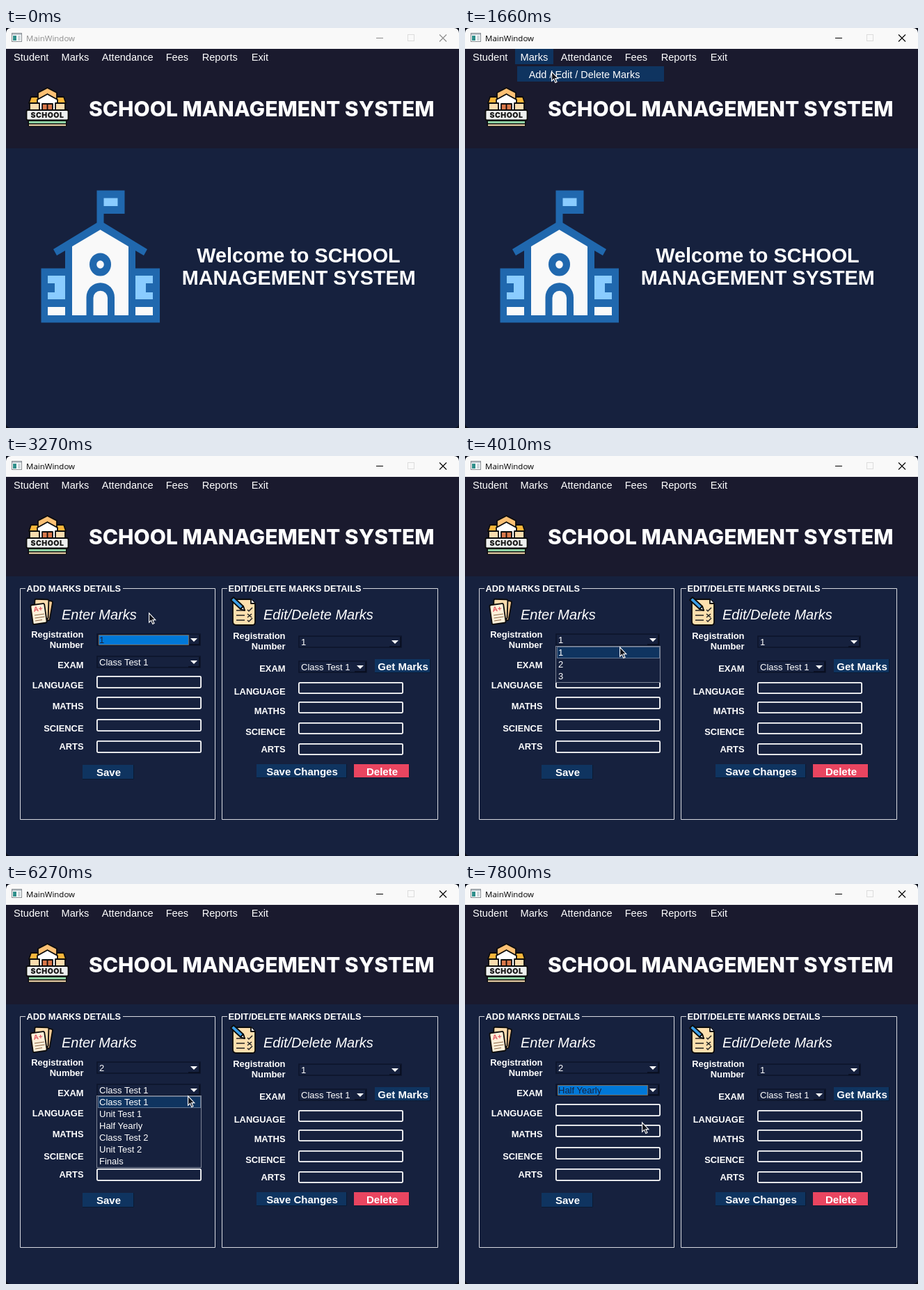
Animation of 651x575 px, one loop 8 s. Source, as an HTML page:

```html
<!DOCTYPE html>
<html lang="en">
<head>
<meta charset="utf-8">
<title>School management</title>
<style>
  html, body { margin: 0; height: 100%; overflow: hidden; background: #0b0f1a; }
  svg { display: block; }
  text { font: 13px "Liberation Sans", Arial, sans-serif; fill: #fff; white-space: pre; }
  .caption { font: 11.5px "Open Sans", sans-serif; fill: var(--ink); }
  .menu { font-size: 14.6px; }
  .item { font-size: 14.45px; }
  .banner { font: 800 30px Inter, sans-serif; }
  .sign { font: 900 10.5px Inter, sans-serif; fill: #161616; text-anchor: middle; letter-spacing: .5px; }
  .welcome { font-size: 28.8px; font-weight: bold; text-anchor: middle; }
  .legend { font-size: 12.8px; font-weight: bold; }
  .heading { font-size: 20px; font-style: italic; }
  .label { font-size: 12.9px; font-weight: bold; text-anchor: end; }
  .button { font-size: 15px; font-weight: bold; text-anchor: middle; }
  .grade { font: bold 10px "Liberation Sans", sans-serif; fill: #e0525e; }
  .outlined { stroke: #0c0c0c; stroke-width: 1.8; stroke-linejoin: round; }
</style>
</head>
<body>
<svg id="stage" width="651" height="575" viewBox="0 0 651 575"></svg>
<script>
const NAVY = '#16213e', BLUE = '#0f3460', RED = '#e94560';
const LOOP = 8000, STEP = 120, ROW = 17;
const exams = ['Class Test 1', 'Unit Test 1', 'Half Yearly', 'Class Test 2', 'Unit Test 2', 'Finals'];

const text = (x, y, s, cls = '', extra = '') => `<text x="${x}" y="${y}" class="${cls}" ${extra}>${s}</text>`;
const rect = (x, y, w, h, fill, extra = '') =>
  `<rect x="${x}" y="${y}" width="${w}" height="${h}" fill="${fill}" ${extra}/>`;
const path = (d, fill, extra = '') => `<path d="${d}" fill="${fill}" ${extra}/>`;
const group = (id, ...parts) => `<g id="${id}">${parts.join('')}</g>`;

function titleBar() {
  return rect(0, 0, 651, 30, '#f9f9f9') +
    rect(8.5, 7.5, 14, 12, '#fff', 'stroke="#8a8f94"') + rect(9, 8, 13, 2, '#b9c3ca') +
    rect(10, 11, 5, 7, '#2f8f8b') + rect(17, 11, 4, 7, '#cfd8dc') +
    text(29, 19, 'MainWindow', 'caption') +
    rect(577.5, 9.5, 9, 9, 'none', 'stroke="#dcdcdc"') +
    path('M532 14.5H542M623 9.5L633 19.5M633 9.5L623 19.5', 'none', 'stroke="var(--ink)" stroke-width="1.1"');
}

function emblem() {
  const shape = (d, fill) => path(d, fill, 'class="outlined"');
  return shape('M34 106H85V120H34Z', '#fbdcae') +
    shape('M36 99H48V108H33ZM71 99H83L86 108H71Z', '#fcb53b') +
    shape('M59.5 86L73 93V106H46V93Z', '#fdc074') +
    shape('M59.5 95L74 103V108H71V119H48V108H45V103Z', '#fff') +
    shape('M52 109H67V119H52Z', '#d9774a') + path('M59.5 109V119', 'none', 'class="outlined"') +
    rect(31.5, 132, 56, 10, '#0c0c0c', 'rx="3"') +
    rect(33, 134, 53, 3, '#8ed2a4') + rect(33, 138.5, 53, 2.2, '#f3d9b0') +
    rect(29.5, 118, 60, 14.5, '#eef0ef', 'rx="2" class="outlined"') +
    text(59.5, 129, 'SCHOOL', 'sign');
}

function schoolHouse() {
  const blue = '#2068ae', sky = '#8accff', white = '#f9f9f9';
  return rect(50.5, 345.5, 170.5, 78, blue) + rect(85, 310, 101, 110, blue) +
    path('M130.5 233.5H170.5V267H140.5V280L203 318L198 327L186 320H85L73 327L68 318L130.5 280Z', blue) +
    rect(140.5, 244.5, 20, 11.5, sky) +
    path('M135.5 290L176 314V413H95V314Z', white) +
    path('M60 356H85V390H60V380H70V367H60ZM211 356H186V390H211V380H201V367H211Z', sky) +
    path('M60 401H85V413H60ZM186 401H211V413H186Z', white) +
    `<ellipse cx="135.5" cy="340" rx="15.5" ry="16.5" fill="${blue}"/>` +
    `<ellipse cx="135.5" cy="340" rx="5.3" ry="5.8" fill="${white}"/>` +
    path('M115.5 413V387A20 20.5 0 0 1 156 387V413Z', blue) +
    path('M125.5 413V388A10 10 0 0 1 146 388V413Z', white);
}

function papersIcon() {
  const card = (angle, x, y, fill) =>
    rect(x, y, 20, 28, fill, `rx="2" class="outlined" transform="rotate(${angle} ${x + 10} ${y + 14})"`);
  const lines = path('M41 229L55 227M41.5 233L55.5 231M42 237L52 235.5', 'none', 'stroke="#8a6a4a" stroke-width="1.2"');
  return card(10, 45, 207, '#f6c893') + card(2, 41, 206, '#fbdcae') + card(-8, 37, 213, '#fff0d9') +
    text(40, 224, 'A+', 'grade', 'transform="rotate(-8 40 224)"') + lines;
}

function checklistIcon() {
  return path('M330 206H352L358 212V239Q358 243 354 243H331Q326 243 326 238V210Q326 206 330 206Z', '#fcdfae', 'class="outlined"') +
    path('M352 206V212H358', '#fff', 'class="outlined"') +
    path('M331 222H343M331 229H343M331 236H343M347 221L349 223 354 218M347 227L353 232M353 227L347 232M347 236L349 238 354 233',
      'none', 'stroke="#222" stroke-width="1.5"') +
    path('M323 207L327 203L341 216L343 222L337 220Z', '#3b9fe8', 'class="outlined"') +
    path('M337 220L341 216L343 222Z', '#fff', 'class="outlined"');
}

function fieldset(x, width, legend, legendWidth) {
  const right = x + width;
  return path(`M${x + 8} 190.5H${x + .5}V522.5H${right + .5}V190.5H${x + 8 + legendWidth}`, 'none', 'stroke="#d8dae0"') +
    text(x + 9.5, 195, legend, 'legend');
}

const labels = (x, ys) => ['Registration', 'Number', 'EXAM', 'LANGUAGE', 'MATHS', 'SCIENCE', 'ARTS']
  .map((s, i) => text(x, ys[i], s, 'label')).join('');

const inputs = (x, ys, h) => ys
  .map(y => rect(x + .9, y + .9, 149.2, h - 1.8, 'none', 'stroke="#fff" stroke-width="1.8" rx="1.5"')).join('');

const button = (x, y, w, h, s, fill = BLUE) =>
  rect(x, y, w, h, fill) +
  path(`M${x} ${y + h - .5}H${x + w - .5}V${y}`, 'none', 'stroke="#0a1a33"') +
  text(x + w / 2 + .5, y + 16, s, 'button');

function combo(x, y, w, value, id) {
  const ax = x + w - 10, ay = y + 7;
  return rect(x + 1, y + 1, w - 2, 16, NAVY, 'stroke="#0d152b" stroke-width="1.6"') +
    path(`M${ax - 8} ${y + 16}H${ax + 8}V${y + 2}`, 'none', 'stroke="#080d1c" stroke-width="1.4"') +
    path(`M${ax - 5} ${ay}H${ax + 5}L${ax} ${ay + 5}Z`, '#fff') +
    (id ? rect(x + 3.5, y + 2.5, w - 21, 14, '#0078d7', `id="${id}Focus" stroke="#e58a2c" stroke-dasharray="1 1"`) : '') +
    text(x + 4, y + 14, value, '', id ? `id="${id}Value"` : '');
}

const list = (id, y, items) => group(id,
  rect(130.5, y + .5, 150, items.length * ROW + 1, NAVY, 'stroke="#7d8496"'),
  rect(132.5, y + 1.5, 147, ROW - 1, BLUE, `id="${id}Hover" stroke="#b9c4d6" stroke-dasharray="1 1"`),
  ...items.map((s, i) => text(134, y + 14 + i * ROW, s)));

const stage = document.getElementById('stage');
stage.innerHTML = '<clipPath id="frame"><rect width="651" height="575" rx="7"/></clipPath><g clip-path="url(#frame)">' +
  rect(0, 0, 651, 575, NAVY) + rect(0, 30, 651, 143, '#1a1a2e') + titleBar() +
  rect(72, 30, 55, 22, BLUE, 'id="marksHover"') +
  [[11, 'Student'], [79.5, 'Marks'], [137.8, 'Attendance'], [229.7, 'Fees'], [281.7, 'Reports'], [352.7, 'Exit']]
    .map(([x, s]) => text(x, 47, s, 'menu')).join('') +
  emblem() + text(119, 126.5, 'SCHOOL MANAGEMENT SYSTEM', 'banner') +
  group('home', schoolHouse(),
    text(420.5, 336.5, 'Welcome to SCHOOL', 'welcome'),
    text(420.8, 368.7, 'MANAGEMENT SYSTEM', 'welcome')) +
  group('marksMenu', rect(75, 55, 211, 22, BLUE), text(91.7, 72, 'Add / Edit / Delete Marks', 'item')) +
  group('form',
    fieldset(20, 280, 'ADD MARKS DETAILS', 140), papersIcon(),
    text(80, 235, 'Enter Marks', 'heading'),
    labels(111.5, [261, 276, 305, 334, 364, 396, 422]),
    combo(130, 255, 150, '1', 'number'), combo(130, 287, 150, exams[0], 'exam'),
    inputs(130, [316, 346, 378, 409], 18), button(110, 444, 74, 21, 'Save'),
    fieldset(310, 310, 'EDIT/DELETE MARKS DETAILS', 195), checklistIcon(),
    text(370, 235, 'Edit/Delete Marks', 'heading'),
    labels(401.5, [263, 278, 310, 343, 371, 401, 426]),
    combo(420, 258, 149, '1'), combo(420, 294, 99, exams[0]),
    button(530, 292, 80, 20, 'Get Marks'),
    inputs(420, [325, 353, 383, 413], 17),
    button(360, 443, 130, 20, 'Save Changes'), button(500, 443, 80, 20, 'Delete', RED),
    list('numberList', 273, ['1', '2', '3']), list('examList', 304, exams)) +
  path('M.6 .8V14.2L3.6 11.4 5.8 16.4 8 15.4 5.8 10.6H9.8Z', '#10131c', 'id="cursor" stroke="#fff" stroke-width="1.1"') +
  '</g>';

const el = Object.fromEntries([...stage.querySelectorAll('[id]')].map(node => [node.id, node]));

// Pointer moves: start time, number of steps, end point
const moves = [
  [420, 1, 495, 182], [540, 3, 128, 25], [900, 1, 108, 32], [1420, 3, 124, 62],
  [2790, 7, 225, 265], [4010, 1, 222, 274], [4130, 3, 208, 303], [4860, 3, 203, 299],
  [5250, 2, 279, 296], [5620, 2, 272, 297], [6270, 1, 261, 304], [6390, 5, 254, 342]
];

function pointer(t) {
  let x = 495, y = 182;
  for (const [start, steps, endX, endY] of moves) {
    if (t < start) break;
    const k = Math.min(1, (Math.floor((t - start) / STEP) + 1) / steps);
    const ease = k * k * (3 - 2 * k);
    x += (endX - x) * ease;
    y += (endY - y) * ease;
  }
  return [x, y];
}

const show = (node, visible) => node.style.display = visible ? '' : 'none';

function setCombo(id, value, focused) {
  show(el[id + 'Focus'], focused);
  el[id + 'Value'].textContent = value;
  el[id + 'Value'].style.fill = focused ? NAVY : '#fff';
}

function setList(id, top, open, y) {
  show(el[id], open);
  el[id + 'Hover'].setAttribute('y', top + 1.5 + ROW * Math.max(0, Math.floor((y - top - 1) / ROW)));
}

function render(t) {
  const within = (from, to) => t >= from && t < to;
  const [x, y] = pointer(t);
  stage.style.setProperty('--ink', t < 1050 ? '#8c8c8c' : '#000');
  show(el.cursor, t >= 420);
  el.cursor.setAttribute('transform', `translate(${Math.round(x)} ${Math.round(y)})`);
  show(el.marksHover, within(900, 2170));
  show(el.marksMenu, within(1420, 2170));
  show(el.home, t < 2170);
  show(el.form, t >= 2170);
  setCombo('number', t < 4740 ? '1' : '2', within(2170, 3630) || within(4740, 5620));
  setCombo('exam', t < 7800 ? exams[0] : exams[2], t >= 7800);
  setList('numberList', 273, within(3630, 4740), y);
  setList('examList', 304, within(5620, 7800), y);
}

const began = performance.now();
function tick() {
  render((performance.now() - began) % LOOP);
  requestAnimationFrame(tick);
}
tick();
</script>
</body>
</html>
```
